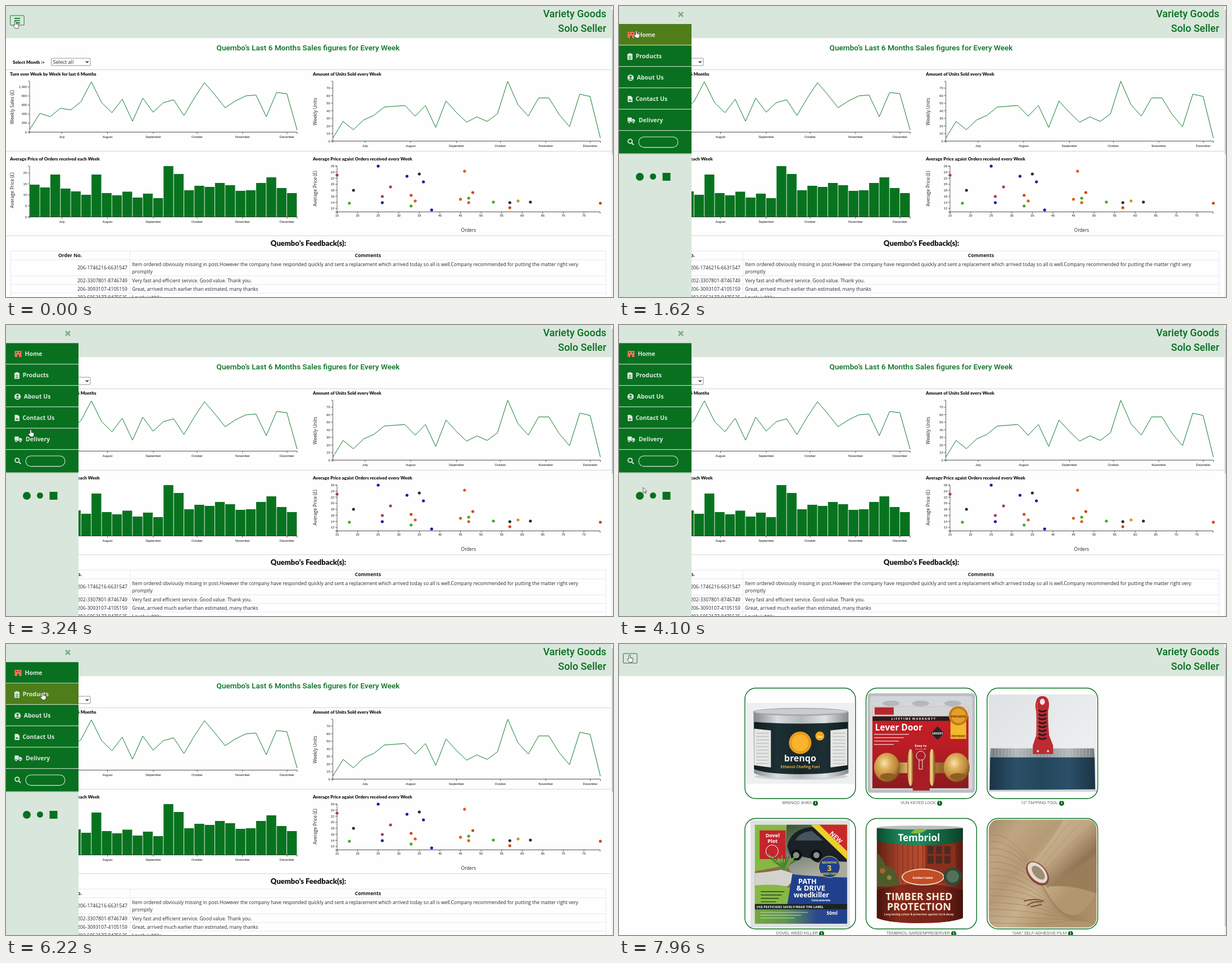
Write an HTML page that moves like this. It is 1080x518 px and loops after 8 s.

```html
<!DOCTYPE html>
<html lang="en">
<head>
<meta charset="utf-8">
<title>Shop dashboard</title>
<style>
  html, body { margin: 0; width: 100%; height: 100%; overflow: hidden; background: #fefefe; }
  #stage { position: relative; width: 1080px; height: 518px; overflow: hidden; }
  #stage > * { position: absolute; left: 0; top: 0; }
  svg { display: block; overflow: visible; }
  text { white-space: pre; }
  .body { font: 8.5px "Open Sans", sans-serif; fill: #24292d; }
  .bold { font: 700 8.6px "Open Sans", sans-serif; fill: #16191c; }
  .head { font: 900 8px Lato, sans-serif; fill: #101412; }
  .axis { font: 5.6px "Liberation Sans", sans-serif; fill: #111; }
  .label { font: 8.2px "Open Sans", sans-serif; fill: #222; }
  .title { font: 500 13.6px Roboto, sans-serif; fill: #06701f; }
  .brand { font: 500 17.9px Roboto, sans-serif; fill: #06701f; }
  .menu { font: 700 10.5px "Open Sans", sans-serif; fill: #dce9df; }
  .mid { text-anchor: middle; }
  .end { text-anchor: end; }
  #side { height: 518px; overflow: hidden; background: #d9e6dc; }
  #shop { width: 1077px; height: 518px; overflow: hidden; }
  .cap { position: absolute; width: 198px; font: 300 7.9px/12px Roboto, sans-serif; color: #1c211e;
    text-align: center; white-space: nowrap; }
  .info { width: 8.6px; height: 8.6px; margin-left: 2.5px; border-radius: 50%; background: #07691f; color: #fff;
    font: 700 7.5px/8.6px "Liberation Serif", serif; }
</style>
</head>
<body>
<div id="stage">
  <svg id="dash" width="1080" height="518"></svg>
  <div id="shop"></div>
  <svg id="top" width="1080" height="518"></svg>
  <div id="side"></div>
  <svg id="cursor" width="1080" height="518"></svg>
</div>
<script>
const $ = id => document.getElementById(id);
const GREEN = '#08701f';
const LOOP = 8000, SHOP_AT = 7030, ICONS_AT = 7110;

const rect = (x, y, w, h, fill, more = '') =>
  `<rect x="${x}" y="${y}" width="${w}" height="${h}" fill="${fill}" ${more}/>`;
const disc = (x, y, r, fill, more = '') => `<circle cx="${x}" cy="${y}" r="${r}" fill="${fill}" ${more}/>`;
const oval = (x, y, rx, ry, fill) => `<ellipse cx="${x}" cy="${y}" rx="${rx}" ry="${ry}" fill="${fill}"/>`;
const path = (d, stroke, w = 1, fill = 'none') =>
  `<path d="${d}" stroke="${stroke}" stroke-width="${w}" fill="${fill}"/>`;
const shape = (d, fill) => path(d, 'none', 0, fill);
const text = (x, y, cls, str, more = '') => `<text x="${x}" y="${y}" class="${cls}" ${more}>${str}</text>`;
const range = (n, f) => Array.from({ length: n }, (_, i) => f(i));
const repeat = (n, f) => range(n, f).join('');

// ---------- dashboard ----------
const MONTHS = ['July', 'August', 'September', 'October', 'November', 'December'];
const MONTH_X = [57.5, 138.5, 220, 298, 379, 458];
const STEP = 476 / 26;

function yAxis(x, top, bottom, ticks) {
  return path(`M${x - 3} ${top}h3V${bottom}h-3`, '#222', .7) + ticks.map(([y, label]) =>
    path(`M${x - 3.3} ${y}h3.3`, '#222', .7) + text(x - 5, y + 2, 'axis end', label)).join('');
}
function monthAxis(x, y) {
  return path(`M${x} ${y + 3}v-3h476v3`, '#222', .8) + MONTHS.map((m, i) =>
    path(`M${x + MONTH_X[i]} ${y}v3.3`, '#222', .7) + text(x + MONTH_X[i], y + 10, 'axis mid', m)).join('');
}
const ticks = (n, y0, dy, label) => range(n, i => [y0 - i * dy, label(i)]);
const line = (x, ys) => path('M' + ys.map((y, i) => `${(x + i * STEP).toFixed(1)} ${y}`).join('L'), '#0b7a2a', 1);
const sideLabel = (x, y, str) => text(0, 0, 'label mid', str, `transform="translate(${x} ${y}) rotate(-90)"`);

const sales = [220, 191, 197, 182, 185, 170, 135, 172, 190, 166, 205, 164, 189, 172, 167, 195, 164, 136.5, 158, 181,
  169, 160, 158.5, 197, 154, 156, 221];
const units = [4, 26, 15, 28, 34, 45, 46, 47, 33, 47, 18, 53, 38, 25, 32, 26, 36, 79, 48, 33, 57, 57, 35, 19, 62, 59, 4];
const barTops = [318, 323, 300, 325, 330, 336, 300, 333, 337, 330.5, 341, 334, 342, 285, 299, 328, 320, 322, 315, 319,
  329, 328, 315, 305, 324, 333];
const DOTS = {
  '#a23a6c': [[15, 301], [26, 339], [28, 322]],
  '#45ab1f': [[18, 351], [33, 356], [47, 342], [53, 349]],
  '#262d3a': [[19, 328], [35, 299], [57, 350], [62, 349]],
  '#0a1fa8': [[25, 285], [26, 350], [32, 303], [36, 313], [38, 363]],
  '#e0591a': [[34, 347], [45, 344], [46, 294], [47, 350]],
  '#cc4a14': [[33, 337], [48, 332], [57, 359], [79, 351]],
  '#c99a1c': [[59, 347]]
};
const COMMENTS = [
  [469, '206-1746216-6631547', ''],
  [492, '202-3307801-8746749', 'Very fast and efficient service. Good value. Thank you.'],
  [507, '206-3093107-4105159', 'Great, arrived much earlier than estimated, many thanks'],
  [522, '202-5953177-9475525', 'Lovely jubbly']
];

$('dash').innerHTML = [
  text(537.5, 79, 'title mid', 'Quembo’s Last 6 Months Sales figures for Every Week'),
  text(12, 103, 'head', 'Select Month :&gt;'),
  rect(80.5, 93, 69.5, 13, '#fff', 'stroke="#777" stroke-width=".8" rx="1"'),
  text(83.5, 102.8, 'body', 'Select all', 'style="font-size:9px"'),
  path('M142 98.3l2.3 2.4 2.3-2.4', '#111', 1.3),
  [113.5, 258.5, 408.8].map(y => path(`M0 ${y}H1077`, '#cbd8d4', 1)).join(''),

  text(7, 124, 'head', 'Turn over Week by Week for last 6 Months'),
  sideLabel(14, 180, 'Weekly Sales (£)'),
  yAxis(42, 134, 224.5, ticks(6, 224.5, 16.1, i => i === 5 ? '1,000' : i * 200)),
  monthAxis(42, 224.5), line(42, sales),

  text(546, 124, 'head', 'Amount of Units Sold every Week'),
  sideLabel(553, 188, 'Weekly Units'),
  yAxis(581.5, 134, 240.5, ticks(8, 240.5, 13.48, i => i * 10)),
  monthAxis(581.5, 240.5), line(581.5, units.map(v => 240.5 - v * 1.348)),

  text(7, 275, 'head', 'Average Price of Orders received each Week'),
  sideLabel(14, 328, 'Average Price (£)'),
  barTops.map((y, i) => rect(42.3 + i * STEP, y, STEP - .9, 375.5 - y, '#08731f')).join(''),
  yAxis(42, 285, 375.5, ticks(5, 375.5, 19.6, i => i * 5)),
  monthAxis(42, 375.5),

  text(546, 275, 'head', 'Average Price agaist Orders received every Week'),
  sideLabel(553, 325, 'Average Price (£)'),
  yAxis(589, 285, 366.5, ticks(8, 360.3, 10.75, i => 12 + i * 2)),
  path('M589 369.5v-3h468v3', '#222', .8),
  repeat(13, i => path(`M${589 + i * 36.6} 366.5v3.3`, '#222', .7) +
    text(589 + i * 36.6, 375.3, 'axis mid', 15 + i * 5)),
  text(823, 402, 'label mid', 'Orders'),
  Object.entries(DOTS).map(([c, pts]) => pts.map(([o, y]) => disc(589 + (o - 15) * 7.32, y, 2.6, c)).join('')).join(''),

  text(538, 427, 'head mid', 'Quembo’s Feedback(s):', 'style="font-size:13px"'),
  path('M8.3 518V436.3H1067.5V518M220.3 436V518M8 451.8H1068M8 480.3H1068M8 495.6H1068M8 511H1068', '#dfe4e6', .8),
  text(114, 447, 'bold mid', 'Order No.'), text(644, 447, 'bold mid', 'Comments'),
  COMMENTS.map(([y, no, note]) =>
    text(216, y, 'body end', no, 'style="font-size:8.6px"') + text(224.5, y, 'body', note)).join(''),
  text(224.5, 463, 'body', 'Item ordered obviously missing in post.However the company have responded quickly and sent ' +
    'a replacement which arrived today so all is well.Company recommended for putting the matter right very'),
  text(224.5, 476, 'body', 'promptly')
].join('');

// ---------- header ----------
$('top').innerHTML = [
  rect(0, 0, 1077, 57.2, '#d9e6dc'),
  text(1068, 20, 'brand end', 'Variety Goods'), text(1068, 46, 'brand end', 'Solo Seller'),
  rect(1077, 0, 3, 518, '#f3f3f3'), rect(1078, 7, 2, 257, '#c4c6c5', 'id="thumb"'),
  '<g id="burger">', rect(7.6, 17, 24.6, 17, 'none', `id="frame" stroke="${GREEN}" stroke-width=".9" rx="1"`),
  '<g id="bars">', path('M15 22.2h10M15 26h10M15 29.8h10', GREEN, 1.7), '</g></g>',
  rect(7, 16.8, 15, 5.8, GREEN, 'id="stub" rx="1.3"')
].join('');

// ---------- side menu ----------
const INK = '#dce9df';
const ITEMS = [
  ['Home', 33.5, rect(15.5, 46, 12, 11, '#f2705a') + rect(18, 48, 2, 2, GREEN) + rect(23, 48, 2, 2, GREEN) +
    rect(20, 53, 3, 4, GREEN)],
  ['Products', 29.7, rect(15, 85, 9, 11, INK, 'rx="1"') + rect(17.5, 84, 4, 3, INK, 'rx="1"') +
    path('M17 89.5h5M17 92h5M17 94h5', GREEN, .8)],
  ['About Us', 31.7, disc(20.6, 127.5, 5.6, INK) + disc(20.6, 125.8, 2, GREEN) +
    shape('M17.3 131a3.4 2.6 0 0 1 6.6 0z', GREEN)],
  ['Contact Us', 29.4, shape('M15.5 160H21l3 3v8h-8.5z', INK) + shape('M17 168.5l2-3 1.5 2 1-1 1 2z', GREEN)],
  ['Delivery', 35, rect(15.3, 198.5, 7.5, 8, INK, 'rx="1"') + shape('M23.5 201h3l2 2.5v3h-5z', INK) +
    [18, 25.5].map(x => disc(x, 207, 1.9, INK, `stroke="${GREEN}" stroke-width=".7"`)).join('')]
];
$('side').innerHTML = '<svg width="129" height="518">' + [
  path('M106 11l8 8M114 11l-8 8', '#7cad88', 2.6),
  rect(0, 262, 129, 2, '#b7cbbd'), rect(0, 32.3, 129, 230, GREEN),
  ITEMS.map(([name, x, icon], i) => rect(0, 32.3 + 38 * i, 129, 37.4, '#4f7d19', `id="hot${i}" opacity="0"`) +
    icon + text(x, 55.3 + 38 * i, 'menu', name) + path(`M0 ${69.7 + 38 * i}H129`, '#e3eee5', 1)).join(''),
  disc(19.8, 240.8, 3.7, 'none', `stroke="${INK}" stroke-width="1.8"`), path('M22.6 243.6l3.6 3.6', INK, 2),
  rect(35, 233, 70, 18.6, 'none', `rx="9.3" stroke="${INK}" stroke-width="1.1"`),
  disc(37, 304, 7, GREEN), disc(60.5, 303.5, 5.5, GREEN), rect(77.5, 297, 14, 14, GREEN)
].join('') + '</svg>';

// ---------- product page ----------
const print = (x, y, size, str, fill = '#fff') =>
  text(x, y, 'mid', str, `style="font:700 ${size}px 'Open Sans',sans-serif;fill:${fill}"`);
const stops = colors => colors.map((c, i) => `<stop offset="${i / (colors.length - 1)}" stop-color="${c}"/>`).join('');
const grad = (id, colors, turn = 0) =>
  `<linearGradient id="${id}" gradientTransform="rotate(${turn})">${stops(colors)}</linearGradient>`;
const ball = (id, colors) => `<radialGradient id="${id}" cx=".4" cy=".35" r=".7">${stops(colors)}</radialGradient>`;

const can = grad('tin', ['#85898b', '#d9dcdd', '#b4b9bb', '#dfe2e3', '#85898b']) +
  grad('wrap', ['#0f1c1f', '#1d3034', '#162629', '#1d3034', '#0f1c1f']) +
  rect(3.5, 27, 192, 144, '#eeeff0') + oval(101, 158, 83, 6, '#cfd1d2') +
  shape('M16 43H185V152Q165 162 100 162Q35 162 17 152z', 'url(#tin)') + oval(100, 43, 85, 7, '#a2a7a9') +
  oval(100, 42.5, 82, 5, '#c9cdcf') + shape('M17 61Q100 67 184 61V145Q160 154 100 154Q40 154 17 145z', 'url(#wrap)') +
  shape('M17 73L47 76V142L17 138z', '#e4e6e6') + shape('M183 73L153 76V142L183 138z', '#e4e6e6') +
  repeat(10, i => path(`M21 ${81 + i * 6}h22M157 ${81 + i * 6}h22`, '#a9aeac', 1)) +
  disc(99, 98, 20, '#e89a1c') + disc(99, 98, 15, '#f6b52c') + disc(134, 86, 8, '#f2a71b') + print(134, 89, 6, '3hr') +
  print(99, 131, 16, 'brenqo', '#f1f3f3') + print(99, 143, 6.8, 'Ethanol Chafing Fuel', '#e3a741');

const knob = x => oval(x, 142, 23, 26, 'url(#knob)') + oval(x + 2, 158, 14, 6, '#8f5f22');
const lock = grad('gold', ['#7c5522', '#e2b766', '#f3d595', '#a87430', '#7c5522']) +
  ball('knob', ['#f8e3ae', '#dcae5b', '#c08a3c', '#6f4a1c']) + grad('card', ['#cc2029', '#b91d25', '#8a191e'], 90) +
  rect(3.5, 10, 191, 177, '#b9bec1', 'rx="5"') + rect(8, 15, 182, 167, '#d3d6d8', 'rx="4"') +
  [45, 98, 155].map(x => oval(x, 28, 15, 5, '#b3b8ba')).join('') + rect(12, 34, 171, 145, 'url(#card)') +
  rect(12, 34, 171, 17, '#d2d5d6') + rect(13, 51, 145, 8, '#2b1c1d') +
  print(85, 57.5, 5.5, 'L I F E T I M E  W A R R A N T Y') + rect(16, 35, 34, 13, '#b8262c') +
  print(59, 76, 15.5, 'Lever Door') + repeat(4, i => path(`M15 ${83 + i * 6}h${62 - i * 9}`, '#e9b9ba', 1.4)) +
  rect(151, 56, 28, 35, '#f0bb2c') + disc(165, 50, 17, '#c67a17') + disc(165, 50, 13, '#e3a02b') +
  print(165, 53, 6, 'PROMISE', '#7d2a12') + print(165, 88, 4.5, 'PREFERRED', '#7d2a12') +
  shape('M128 69l12 12-12 12-12-12z', '#2b2024') + print(128, 83, 5, 'GRADE3') +
  print(98, 105, 6, 'Easy to') + print(98, 112, 6, 'Install') +
  rect(50, 133, 100, 19, 'url(#gold)') + [80, 118].map(x => oval(x, 142, 6, 33, 'url(#gold)')).join('') +
  rect(84, 110, 30, 73, '#a81d25') + disc(98, 121, 8, 'none', 'stroke="#eee"') + path('M95 128v17h6v-17', '#eee', 1) +
  knob(38) + knob(162);

const scraper = grad('steel', ['#6f7678', '#b4b9bb', '#8d9395', '#b4b9bb', '#777d80']) +
  grad('blade', ['#1b3344', '#2b5068', '#24465b', '#2b5068', '#1b3344']) + grad('wall', ['#dfe2e4', '#eceeef'], 40) +
  rect(3.5, 12, 192, 173, 'url(#wall)') + shape('M4 180L196 182V185H4z', '#cdd1d3') +
  shape('M7 108H191L192 124H6z', 'url(#steel)') +
  repeat(30, i => path(`M${9 + i * 6} 109v14`, '#cfd3d5', .5)) + shape('M6 124H192L193 181L5 182z', 'url(#blade)') +
  shape('M88 24Q90 15 99 15T110 24Q112 32 109 42Q109 65 111 85L118 103V118H82V103L88 85Q89 65 88 42Q85 32 88 24z', '#bd2a2f') +
  path('M90 26Q88 34 91 44Q92 70 90 88', '#d9484b', 2) + oval(99, 25, 4.5, 5.5, '#e4e6e8') +
  repeat(8, i => path(`M92 ${40 + i * 7}q7 5 14 0`, '#2b1a1e', 3)) + disc(91, 113, 2, '#ddd') + disc(109, 113, 2, '#ddd');

const weedkiller = rect(10.5, 4, 177, 191, '#dfe0e1') + rect(18.5, 12, 164, 176, '#86b843') +
  grad('yard', ['#3c5233', '#6f7f69', '#a9aaa2'], 70) + grad('foot', ['#74a73e', '#5f9650', '#2b4a8c', '#20408d']) +
  shape('M75 12H182.5V110H70z', 'url(#yard)') +
  shape('M76 50Q82 20 118 16L160 22 182 60V78L140 76Q130 84 118 72L80 64z', '#1a2025') + shape('M90 40Q98 25 120 23L140 40z', '#46545e') +
  [92, 128].map(x => disc(x, 66, 10, '#0c0f12') + disc(x, 66, 5.5, '#8b9094')).join('') +
  shape('M118 12H182.5V74z', '#ecd02e') + shape('M133 12H182.5V59z', '#c9282a') +
  print(0, 0, 11, 'NEW').replace('<text', '<text transform="translate(160 37) rotate(43)"') +
  rect(27, 22, 46, 51, '#c5242b') + print(50, 34, 9, 'Dovel') + print(50, 44, 9, 'Plot') +
  disc(49, 59, 11, '#c5242b', 'stroke="#fff"') + shape('M18.5 95L75 84 86 103V125H18.5z', '#8a6b45') +
  repeat(19, i => path(`M70 98Q${60 + i} 80 ${42 + i * 3} ${64 + (i * 7) % 18}`, i % 2 ? '#3c7428' : '#6f9d46', 1.8)) +
  shape('M18.5 98L40 96 66 92 84 98 88 110 76 122 52 119 18.5 124z', '#d3d3ce') + shape('M18.5 120Q60 116 80 124L78 153H18.5z', '#86b843') +
  shape('M85 100Q120 104 182.5 106V155H76z', '#20408d') + disc(151, 87, 19, '#20408d', 'stroke="#e6cb45"') +
  print(151, 81, 6, 'MONTHS', '#f0d94d') + print(151, 94, 14, '3', '#f0d94d') + print(151, 101, 5, 'WEED FREE', '#f0d94d') +
  print(112, 117, 13, 'PATH') + print(118, 129, 13, '&amp; DRIVE') + print(119, 141, 12, 'weedkiller') +
  print(136, 148, 5.5, 'Concentrate') +
  repeat(4, i => path(`M29 ${131 + i * 6}h${42 - i * 5}`, '#25481f', 1.4)) + rect(18.5, 162, 164, 26, 'url(#foot)') +
  rect(18.5, 153, 164, 9.5, '#1c2422') + print(81, 160.5, 6, 'USE PESTICIDES SAFELY/READ THE LABEL') +
  repeat(3, i => path(`M28 ${168 + i * 5}h${85 - i * 12}`, '#dfe9d6', .8)) + print(156, 172, 8, '50ml');

const paint = grad('wood', ['#5a1d12', '#a3412a', '#b54c2f', '#a23c24', '#571a11']) +
  grad('lid', ['#0c4a30', '#198055', '#1c8a5b', '#12623f', '#0b4029']) +
  grad('base', ['#46130d', '#86291b', '#7b2419', '#7b2419', '#45120d']) +
  shape('M20 18H173V178Q150 187 96 187T20 178z', 'url(#wood)') +
  repeat(9, i => path(`M${30 + i * 9} 45V120`, '#83301d', 1.2)) + rect(106, 46, 54, 70, '#8a2f1c') +
  repeat(6, i => rect(110 + (i % 3) * 15, 50 + Math.floor(i / 3) * 17, 11, 14, '#4d2a22')) +
  shape('M20 62Q30 70 36 86Q48 84 56 104L62 122H20z', '#4f5a2a') + disc(30, 94, 5, '#a4642c') + disc(42, 106, 4, '#8d8a3d') +
  oval(96, 17, 76, 3.5, '#b9bfbd') + shape('M20 18Q96 24 173 18V40Q150 48 96 48T20 40z', 'url(#lid)') +
  shape('M80 27q10-12 28-6q-8 8-28 6z', '#8cb83f') + print(95, 41, 17, 'Tembriol') +
  shape('M20 128Q60 117 96 117T173 128V178Q150 187 96 187T20 178z', 'url(#base)') +
  oval(102, 105, 38, 15, '#e7d5bd') + oval(102, 105, 36, 13, '#c24e25') + print(102, 108, 5.5, 'Golden Cedar') +
  disc(155, 104, 16, '#2d4a35') + disc(155, 104, 11, '#58705a') +
  print(95, 146, 18, 'TIMBER SHED', '#f3ead9') + print(95, 164, 18, 'PROTECTION', '#f3ead9') +
  print(95, 173, 4.8, 'Long lasting colour &amp; protection against rot &amp; decay', '#edd9bf');

const film = grad('oak', ['#a88d6a', '#c0a582', '#b59a76', '#c8b08d', '#b2966f'], 40) +
  grad('roll', ['#9c8160', '#c9b290', '#bfa582', '#8f7453'], 45) + rect(3.5, 3, 192, 192, 'url(#oak)', 'rx="17"') +
  repeat(14, i => path(`M5 ${30 + i * 12}Q${50 + i * 3} ${22 + i * 13} ${100 + i * 2} ${120 + i * 5}T194 ${136 + i * 4}`, '#9b7f5b', .7)) +
  shape('M72 88Q110 50 137 3H180Q195 4 195 20V72L108 124z', 'url(#roll)') +
  repeat(6, i => path(`M${82 + i * 5} ${92 + i * 6}L${150 + i * 9} ${4 + i * 12}`, '#a98f6c', .7)) +
  shape('M112 122L195 66V134Q150 118 112 122z', '#9a7e5a') +
  '<g transform="rotate(48 91 98)">' + oval(91, 99, 25, 16, '#8a4a39') + oval(90, 98, 22, 13, '#e3dace') + oval(91, 97, 15, 8, '#9d8c76') +
  '</g>' + path('M66 148q18-6 36 0M72 156q12-10 26-6M78 158l20-4', '#765233', 2);

const PHOTOS = [can, lock, scraper, weedkiller, paint, film];
const NAMES = ['BRENQO 3HRS', 'VUN KEYED LOCK', '12" TAPPING TOOL',
  'DOVEL WEED KILLER', 'TEMBRIOL GARDENPRESERVER', '"OAK" SELF-ADHESIVE FILM',
  'PELDARS BRUSH', 'GOLBEN 9" ROLLER FRAME', 'GOLBEN WINDOW SCRAPER',
  'WUXLO SPEAKER', 'MIRDOVA ANTIQUE PINE VARNISH', 'MIRDOVA NATURAL TEAK FURNITURE OIL',
  'MIRDOVA DARK OAK VARNISH (750ML)', 'KORVEND KVD30577', 'KORVEND KVD71846',
  'OLTRAMEK SOAP HOLDER', 'OLTRAMEK WOOD TO METAL DOWEL'];
const LOADED_AT = [SHOP_AT, SHOP_AT, 7110, 7190, 7190, 7270];

$('shop').innerHTML = '<svg width="1077" height="518">' + NAMES.map((name, i) =>
  `<g class="tile"><g class="photo">${PHOTOS[i] || ''}</g>` +
  rect(.7, .7, 196.8, 0, 'none', `class="rim" stroke="${GREEN}" stroke-width="1.4"`) + '</g>').join('') + '</svg>' +
  NAMES.map(name => `<div class="cap">${name}<span class="info">i</span></div>`).join('');
const all = cls => document.querySelectorAll('.' + cls);
const tiles = all('tile'), photos = all('photo'), rims = all('rim'), caps = all('cap'), infos = all('info');

function layoutShop(t) {
  let top = 78;
  for (let row = 0; row < 6; row++) {
    let tall = false;
    for (let i = row * 3; i < Math.min(row * 3 + 3, NAMES.length); i++) {
      const full = t >= LOADED_AT[i], left = 223.3 + (i % 3) * 215.5;
      tall = tall || full;
      tiles[i].setAttribute('transform', `translate(${left} ${top + (full ? -.2 : 3.6)})`);
      photos[i].style.display = full ? '' : 'none';
      rims[i].setAttribute('height', full ? 196.8 : 5.8);
      rims[i].setAttribute('rx', full ? 19.5 : 2.9);
      Object.assign(caps[i].style, { left: left + 'px', top: top + (full ? 199 : 14) + 'px' });
      infos[i].style.display = t >= ICONS_AT ? 'inline-block' : 'none';
    }
    top += tall ? 232 : 47.6;
  }
}

// ---------- pointer ----------
$('cursor').innerHTML = '<g id="pointer"><g id="hand">' +
  path('M-1.3 7V1.1a1.2 1.2 0 0 1 2.5 0V4.6l3.6 .8q1.3 .3 1.2 1.7l-.5 3.2-1 2.6h-5L-4 8.7q-.7-1.3 .2-1.7 .9-.3 1.4 .4z', '#2a2a2a', .8, '#fff') +
  path('M1.2 4.8v2M3 5.2v1.8M4.6 5.6v1.6', '#2a2a2a', .4) + '</g><g id="arrow">' +
  path('M0 0V9.6L2.2 7.6 3.6 10.8 5 10.2 3.6 7.1H6.6z', '#222', .7, '#fff') + '</g></g>';

// time, x, y
const MOVES = [[0, 17, 27], [209, 17, 27], [210, 19, 26.5], [439, 19, 26.5], [440, 18.5, 26.3], [830, 18.5, 26.3],
  [1150, 22, 32], [1620, 31, 44], [1690, 31, 46], [2000, 33, 80], [2480, 36, 128], [2550, 37, 131], [3000, 42, 170],
  [3240, 44, 186], [3320, 44, 195], [3700, 44, 240], [4100, 43, 289], [4180, 43, 300], [4270, 44, 302],
  [4650, 62, 303], [5040, 85, 305], [5120, 88, 306], [5260, 88, 306], [5400, 90, 215], [5520, 91, 149],
  [5750, 84, 108], [6060, 67, 86], [6220, 65.5, 86.5], [6519, 65.5, 86.5], [6520, 64.5, 87], [7090, 64.5, 87],
  [7500, 42, 56], [7820, 24, 28], [7960, 19, 19.5], [8000, 19, 19.5]];
const ARROW = [[3700, 4270], [5270, 5370], [7110, 7840]];
// menu row, pointer in, pointer out
const HOVERS = [[0, 1250, 1700], [1, 1860, 2200], [2, 2260, 2640], [3, 2720, 3030], [4, 3320, 3620],
  [3, 5380, 5570], [2, 5590, 5740], [1, 5780, 7030]];

const clamp = v => Math.max(0, Math.min(1, v));
const within = (t, [a, b]) => t >= a && t < b;
const show = (id, on) => { $(id).style.display = on ? '' : 'none'; };

function pointerAt(t) {
  const i = Math.max(1, MOVES.findIndex(m => m[0] > t));
  const [t0, x0, y0] = MOVES[i - 1], [t1, x1, y1] = MOVES[i];
  const p = (t - t0) / (t1 - t0);
  return [x0 + (x1 - x0) * p, y0 + (y1 - y0) * p];
}

function render(t) {
  const shop = t >= SHOP_AT;
  show('dash', !shop);
  show('shop', shop);
  show('side', !shop && t >= 830);
  show('stub', shop && t < ICONS_AT);
  show('burger', !shop || t >= ICONS_AT);
  show('bars', t < 7880);
  $('thumb').setAttribute('height', shop ? 496 : 257);
  $('frame').setAttribute('stroke-width', t >= 610 && !shop ? 1.6 : .9);
  if (shop) layoutShop(t);

  const open = clamp((t - 790) / 500);
  $('side').style.width = 129 * open * open * (3 - 2 * open) + 'px';

  const heat = [0, 0, 0, 0, 0];
  for (const [row, start, end] of HOVERS) {
    heat[row] = Math.max(heat[row], clamp((t - start) / 200) * clamp(1 - (t - end) / 200));
  }
  heat.forEach((v, i) => $('hot' + i).setAttribute('opacity', v));

  const [x, y] = pointerAt(t);
  const arrow = ARROW.some(span => within(t, span));
  $('pointer').setAttribute('transform', `translate(${x} ${y})`);
  show('arrow', arrow);
  show('hand', !arrow);
}

const start = performance.now();
function tick() {
  render((performance.now() - start) % LOOP);
  requestAnimationFrame(tick);
}
tick();
</script>
</body>
</html>
```
